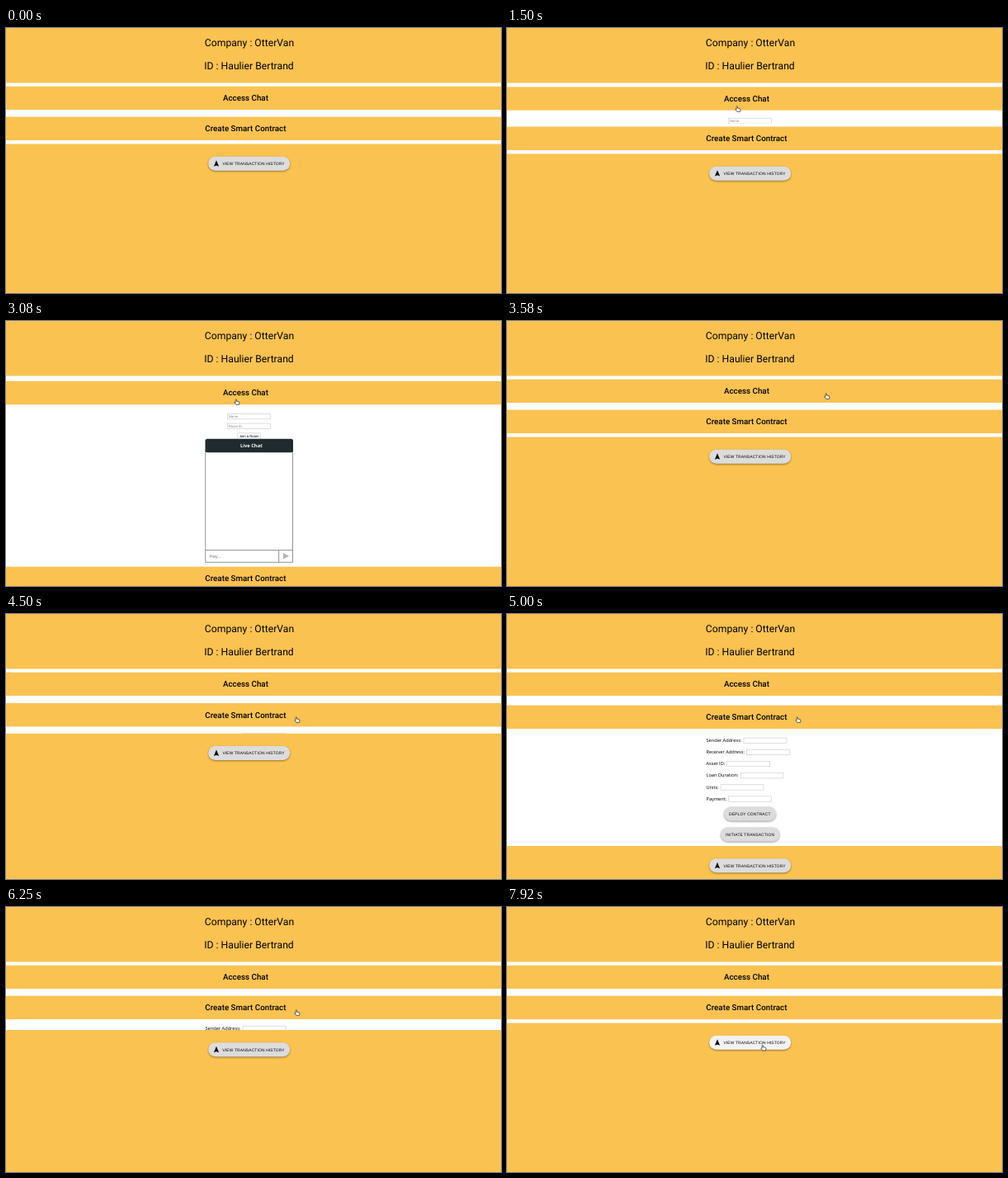
An HTML page that plays this animation: 600 px wide and 321 px high, repeating every 8000 ms.

```html
<!DOCTYPE html>
<html lang="en">
<head>
<meta charset="utf-8">
<title>Haulier dashboard</title>
<style>
  html, body { margin: 0; width: 100%; height: 100%; overflow: hidden; background: #fff; }
  svg { display: block; width: 100%; height: 100%; text-rendering: geometricPrecision; }
  .bar { fill: #fac250; }
  .title { font: 12.2px Roboto, sans-serif; text-anchor: middle; }
  .panel { font: 500 9.8px Roboto, sans-serif; text-anchor: middle; }
  .label { font: 5.65px "Open Sans", sans-serif; }
  .live { font: 700 5.8px "Open Sans", sans-serif; fill: #fff; text-anchor: middle; }
  .hint { font: 4.2px "Liberation Sans", sans-serif; fill: #888; }
  .join { font: 4.2px "Liberation Sans", sans-serif; text-anchor: middle; }
  .field { fill: #fff; stroke: #c8c8c8; stroke-width: .6; }
  .frame { fill: none; stroke: #777; stroke-width: .8; }
  .pill { fill: #dcdcdc; filter: drop-shadow(0 1px 1.2px rgba(0, 0, 0, .4)); }
  .caps { font: 4.93px "Liberation Sans", sans-serif; letter-spacing: .141px; }
  #cursor path { fill: #fff; stroke: #222; stroke-width: .7; stroke-linejoin: round; }
</style>
</head>
<body>
<svg viewBox="0 0 600 321" preserveAspectRatio="none">
  <rect class="bar" width="600" height="66.5"/>
  <text class="title" x="295" y="22.3">Company : OtterVan</text>
  <text class="title" x="294.5" y="50.3">ID : Haulier Bertrand</text>

  <g id="chat">
    <rect class="field" x="268.5" y="112.3" width="52" height="6.5"/>
    <text class="hint" x="269.8" y="117.1">Name</text>
    <rect class="field" x="268.5" y="124.1" width="52" height="6.5"/>
    <text class="hint" x="269.8" y="128.9">Room ID</text>
    <rect class="field" x="280.8" y="135.6" width="27.8" height="8" rx="1"/>
    <text class="join" x="294.7" y="140.6">Join a Room</text>
    <rect class="frame" x="241.8" y="157" width="105.8" height="135.2"/>
    <path class="frame" d="M241.8 277.6H347.6M330.7 277.6V292.2"/>
    <rect x="241.5" y="142.8" width="106.5" height="16.4" rx="2.5" fill="#1f2b2e"/>
    <text class="live" x="297.3" y="152.9">Live Chat</text>
    <text class="label" x="246.5" y="287" fill="#777">Hey...</text>
    <path d="M336 281L343.2 284.8L336 288.6Z" fill="#b5b5b5"/>
  </g>

  <g id="access">
    <rect class="bar" y="70.7" width="600" height="28.3"/>
    <text class="panel" x="290.4" y="88.2">Access Chat</text>
  </g>

  <g id="lower">
    <rect y="103.5" width="600" height="400" fill="#fff"/>
    <g id="contract"></g>
    <g id="create">
      <rect class="bar" y="107.6" width="600" height="28.4"/>
      <text class="panel" x="290.4" y="125.2">Create Smart Contract</text>
    </g>
    <g id="footer">
      <rect class="bar" y="140.5" width="600" height="400"/>
    </g>
  </g>

  <g id="cursor">
    <path id="hand" d="M-1.9 -2.8Q-1.2 -4-.5 -2.8V-.9L2.2 -.3Q3.1 0 3 1L2.5 3.4H-1.1L-3.1 .8Q-3 -.1-1.9 .6Z"/>
    <path id="arrow" style="fill:#111;stroke:#fff" d="M-2.5 -4V3L-.9 1.6L.2 4L1.3 3.5L.2 1.2H2.4Z"/>
  </g>
</svg>
<script>
const LOOP = 8000, FPS = 12;
const $ = id => document.getElementById(id);

const pill = (x, y, width, textX, text) =>
  `<rect class="pill" x="${x}" y="${y}" width="${width}" height="17" rx="8.5"/>
   <text class="caps" x="${textX}" y="${y + 10.2}">${text}</text>`;

// Label and left edge of its input
const fields = [["Sender Address:", 287], ["Receiver Address:", 290.5], ["Asset ID:", 266.7],
  ["Loan Duration:", 283], ["Units:", 259], ["Payment:", 268.3]];

$("contract").innerHTML = fields.map(([text, x], i) => {
  const y = 153 + i * 14.15;
  return `<text class="label" x="241.5" y="${y + 1.9}">${text}</text>
    <rect class="field" x="${x}" y="${y - 2.9}" width="52" height="6.4"/>`;
}).join("") + pill(263, 233.6, 63, 269, "DEPLOY CONTRACT")
  + pill(259, 258.5, 71.5, 265, "INITIATE TRANSACTION");

$("footer").innerHTML += pill(245.2, 155.8, 99, 262.4, "VIEW TRANSACTION HISTORY")
  + '<path d="M255 160.3L258.1 167.7L255 166.4L251.9 167.7Z"/>';
const historyButton = $("footer").querySelector(".pill");

const clamp = v => Math.min(1, Math.max(0, v));

// cubic-bezier(.4, 0, .2, 1)
function ease(x) {
  if (x <= 0 || x >= 1) return clamp(x);
  let low = 0, high = 1, s;
  for (let i = 0; i < 20; i++) {
    s = (low + high) / 2;
    const at = 1.2 * (1 - s) ** 2 * s + .6 * (1 - s) * s * s + s ** 3;
    if (at < x) low = s; else high = s;
  }
  return s * s * (3 - 2 * s);
}

const openness = (t, open, close, duration) =>
  ease((t - open) / duration) - ease((t - close) / duration);

const path = [[420, 199, 311], [670, 262, 164], [840, 285, 24], [1000, 277, 75], [1160, 277, 98],
  [1250, 280, 98], [3200, 280, 98], [3500, 388, 91], [3590, 388, 91], [3750, 368, 112],
  [4000, 353, 128], [6400, 353, 128], [6830, 343, 123], [7670, 311, 170.5], [LOOP, 311, 170.5]];

function pointer(t) {
  const i = path.findIndex(p => p[0] > t);
  if (i < 1) return null;
  const [t0, x0, y0] = path[i - 1], [t1, x1, y1] = path[i];
  const k = (t - t0) / (t1 - t0), e = k * k * (3 - 2 * k);
  return [x0 + (x1 - x0) * e, y0 + (y1 - y0) * e];
}

const moveY = (id, y) => $(id).setAttribute("transform", `translate(0 ${y})`);

function draw(t) {
  const chatMargin = openness(t, 1458, 3085, 150), chatHeight = openness(t, 1458, 3085, 300);
  const formMargin = openness(t, 4470, 6041, 150), formHeight = openness(t, 4470, 6041, 300);

  moveY("access", 2.2 * chatMargin);
  moveY("chat", -4.5 * (1 - chatMargin));
  moveY("lower", 5 * chatMargin + 185 * chatHeight);
  moveY("create", 3 * formMargin);
  moveY("contract", -6 * (1 - formMargin));
  moveY("footer", 6 * formMargin + 134.5 * formHeight);

  const grey = 220 + 22 * ease((t - 7670) / 250);
  historyButton.style.fill = `rgb(${grey} ${grey} ${grey})`;

  const at = pointer(t);
  $("cursor").style.display = at ? "" : "none";
  if (!at) return;
  $("cursor").setAttribute("transform", `translate(${at})`);
  const onControl = at[1] > 71 && at[1] < 174;
  $("hand").style.display = onControl ? "" : "none";
  $("arrow").style.display = onControl ? "none" : "";
}

function tick() {
  const t = performance.now() % LOOP;
  draw(Math.floor((t + 4) * FPS / 1000) * 1000 / FPS % LOOP);
  requestAnimationFrame(tick);
}
tick();
</script>
</body>
</html>
```
